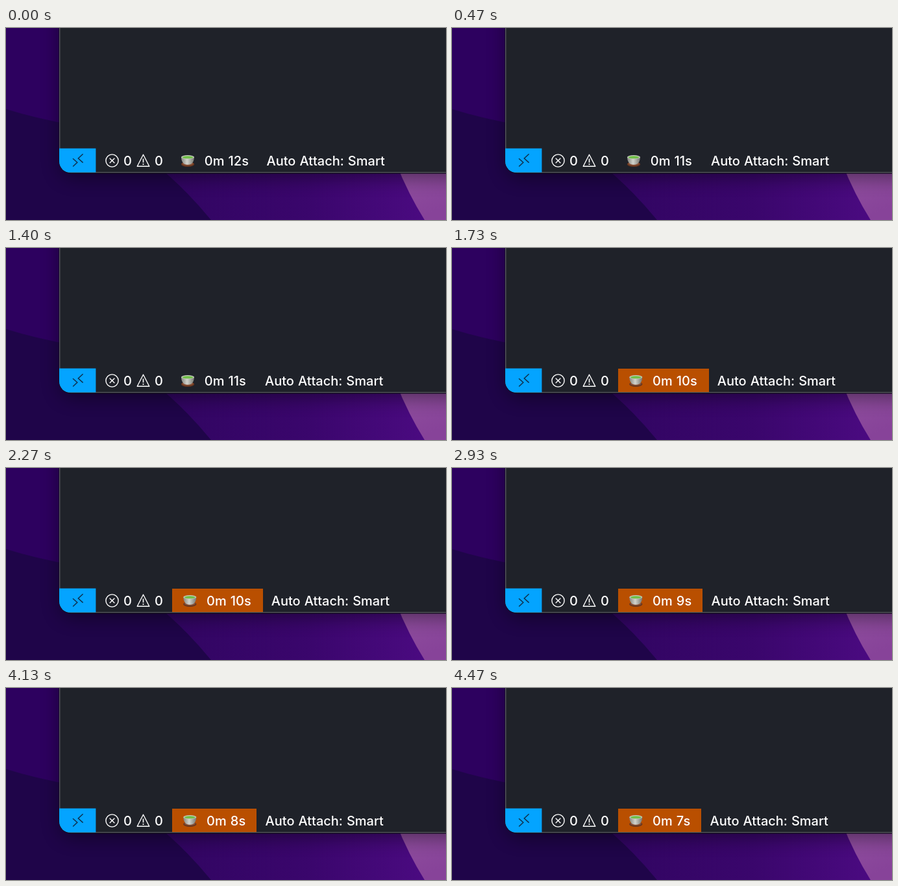
These frames come from a looping animation (678x296 px, 4.54 s). An HTML page:

```html
<!DOCTYPE html>
<html lang="en">
<head>
<meta charset="utf-8">
<title>Status bar countdown</title>
<style>
  html, body { margin: 0; width: 100%; height: 100%; overflow: hidden; background: #1d0544; }
  svg { display: block; width: 100vw; height: 100vh; }
  text { font: 500 20px Inter, "Open Sans", sans-serif; word-spacing: .7px; fill: #fff; }
  .icon { fill: none; stroke: #fff; stroke-width: 1.4; stroke-linejoin: round; }
</style>
</head>
<body>
<svg viewBox="0 0 678 296" preserveAspectRatio="none">
  <defs>
    <linearGradient id="lower" gradientUnits="userSpaceOnUse" x1="250" y1="0" x2="640" y2="0">
      <stop offset="0" stop-color="#310562"/>
      <stop offset=".55" stop-color="#3a066c"/>
      <stop offset="1" stop-color="#4a0a80"/>
    </linearGradient>
    <linearGradient id="pink" x2=".4" y2="1">
      <stop offset="0" stop-color="#91519f"/>
      <stop offset="1" stop-color="#874399"/>
    </linearGradient>
    <linearGradient id="bowl">
      <stop offset="0" stop-color="#85867f"/>
      <stop offset=".45" stop-color="#d2d3cc"/>
      <stop offset="1" stop-color="#777872"/>
    </linearGradient>
    <filter id="blur" x="-20%" y="-30%" width="140%" height="160%">
      <feGaussianBlur stdDeviation="15"/>
    </filter>
    <clipPath id="frame"><rect x="82" y="-40" width="700" height="263.4" rx="18"/></clipPath>
  </defs>

  <rect width="678" height="296" fill="#1f0549"/>
  <path d="M0 0H100V149Q45 139 0 125Z" fill="#2d015f"/>
  <path d="M230 210Q275 246 316 296H678V210Z" fill="url(#lower)"/>
  <path d="M600 205Q617 251 645 296H678V205Z" fill="url(#pink)"/>

  <rect x="84" y="-60" width="760" height="290" rx="19" filter="url(#blur)" opacity=".45"/>
  <rect x="81.5" y="-40" width="700" height="264.5" rx="19" fill="#0c0718"/>
  <g clip-path="url(#frame)">
    <rect x="82" y="-40" width="700" height="264" fill="#1f2229"/>
    <rect x="82.7" y="-40" width="700" height="262.7" rx="17.5" fill="none" stroke="#5a5b61" stroke-width="1.3"/>
    <rect x="82" y="185.6" width="56.4" height="37" fill="#04a4ff"/>
  </g>
  <path d="M103 201.3L109.8 207.3L103.2 213.5M118.6 194.3L111.3 201L118.6 207.6" fill="none" stroke="#10304f" stroke-width="1.5"/>

  <g class="icon">
    <circle cx="163.5" cy="204.5" r="9.6"/>
    <path d="M159.7 200.7L167.3 208.3M167.3 200.7L159.7 208.3"/>
    <path d="M211.5 195.2L220.8 213.3H202.2Z"/>
    <path d="M211.5 201.5V207.5M211.5 209V211" stroke-width="1.6"/>
  </g>
  <text x="181" y="212">0</text>
  <text x="229" y="212">0</text>

  <rect id="alert" x="256" y="186" height="36" fill="#b94f00"/>
  <g id="timer">
    <ellipse cx="280" cy="210" rx="10.2" ry="4" fill="#69371f"/>
    <ellipse cx="280" cy="209.3" rx="8.6" ry="2.8" fill="#8a5136"/>
    <path d="M270 199Q270 206 274.5 209.6Q280 212 285.5 209.6Q290 206 290 199Z" fill="url(#bowl)"/>
    <ellipse cx="280" cy="199" rx="10" ry="3" fill="#c9cbc2"/>
    <ellipse cx="280" cy="199.3" rx="8.6" ry="2" fill="#70c048"/>
    <text id="count" x="305.8" y="212"></text>
  </g>
  <text id="attach" y="212">Auto Attach: Smart</text>
</svg>
<script>
  const LOOP = 4540, FIRST_TICK = 435, START = 12, WARN_AT = 10;
  const labelX = [401.5, 399, 408.8, 399.6, 399.6, 397.6];
  const $ = id => document.getElementById(id);
  const alertBox = $("alert"), timer = $("timer"), count = $("count"), attach = $("attach");
  let shown = -1;

  function draw(ms) {
    const tick = Math.floor((ms % LOOP + 1000 - FIRST_TICK) / 1000);
    if (tick === shown) return;
    shown = tick;
    const left = START - tick, warn = left <= WARN_AT;
    count.textContent = `0m ${left}s`;
    attach.setAttribute("x", labelX[tick]);
    alertBox.setAttribute("width", warn ? Math.round(labelX[tick] - 13.2) - 256 : 0);
    timer.setAttribute("transform", `translate(${warn ? 3.3 : 0} 0)`);
  }

  const begin = performance.now();
  function loop() {
    draw(performance.now() - begin);
    requestAnimationFrame(loop);
  }
  loop();
</script>
</body>
</html>
```
